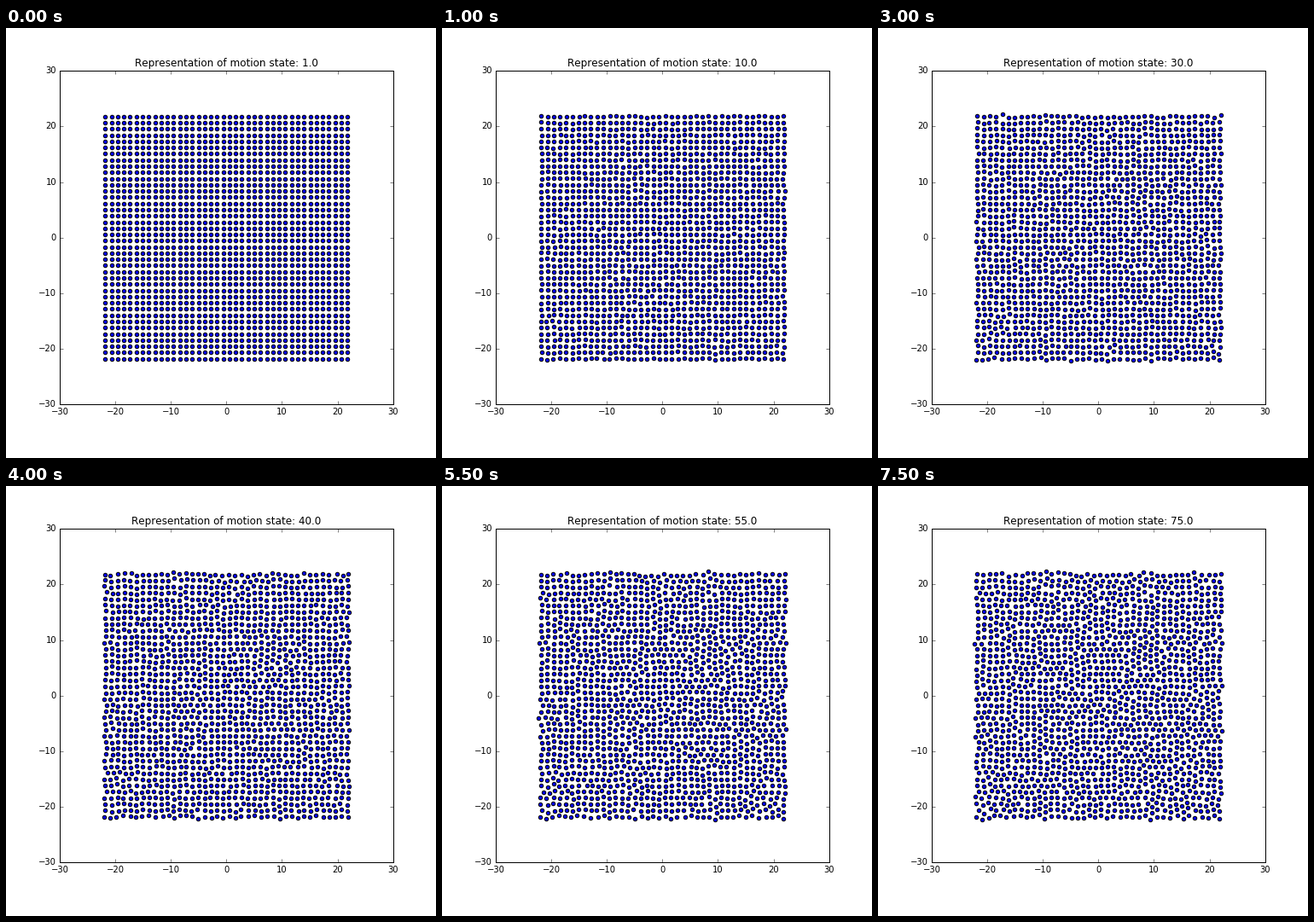
Recreate the animation shown at these times as a matplotlib script. Size 504 by 504 pixels, loop 8 s.

```python
import numpy as np
import matplotlib.pyplot as plt
from matplotlib.animation import FuncAnimation

plt.rcParams.update({
    "font.family": "DejaVu Sans", "font.size": 10,
    "text.kerning_factor": 6, "ytick.alignment": "center",
    "axes.linewidth": 1.0, "axes.titlesize": 12,
    "axes.titlepad": 5, "axes.titley": 1.0,
})

SIDE = 40            # particles per row
DENSITY = 0.8
TEMPERATURE = 0.3
MAX_STEP = 0.075     # largest trial move along each axis
STATES = [1] + list(range(5, 80, 5))
SHIFTS = [(i, j) for i in range(-2, 3) for j in range(-2, 3) if (i, j) != (0, 0)]


def energy(here, near):
    """Lennard-Jones energy of each particle with its neighbours."""
    r2 = np.maximum(((near - here) ** 2).sum(-1), 0.3)
    inv6 = r2 ** -3
    return (4 * (inv6 ** 2 - inv6)).sum(0)


def sweep(grid, rng):
    """One Metropolis sweep; particles three cells apart move together."""
    for k in rng.permutation(9):
        rows, cols = np.meshgrid(np.arange(k // 3, SIDE, 3) + 2,
                                 np.arange(k % 3, SIDE, 3) + 2, indexing="ij")
        here = grid[rows, cols]
        near = np.array([grid[rows + i, cols + j] for i, j in SHIFTS])
        trial = here + rng.uniform(-MAX_STEP, MAX_STEP, here.shape)
        rise = energy(trial, near) - energy(here, near)
        accept = rng.random(rise.shape) < np.exp(-np.maximum(rise, 0) / TEMPERATURE)
        grid[rows, cols] = np.where(accept[..., None], trial, here)


def simulate():
    rng = np.random.default_rng(8)
    axis = (np.arange(SIDE) - (SIDE - 1) / 2) / np.sqrt(DENSITY)
    grid = np.full((SIDE + 4, SIDE + 4, 2), 1e4)   # far-away padding
    grid[2:-2, 2:-2] = np.stack(np.meshgrid(axis, axis), -1)
    shots = []
    for step in range(1, STATES[-1] + 1):
        if step > 1:
            sweep(grid, rng)
        if step in STATES:
            shots.append(grid[2:-2, 2:-2].reshape(-1, 2).copy())
    return shots


shots = simulate()

fig = plt.figure(figsize=(7, 7), dpi=72, facecolor="white")
ax = fig.add_axes([0.125, 0.125, 0.775, 0.775])
dots = ax.scatter(*shots[0].T, s=20, c="#0000ff", edgecolors="black", linewidths=1)
ax.set(xlim=(-30, 30), ylim=(-30, 30),
       xticks=range(-30, 31, 10), yticks=range(-30, 31, 10))
ax.tick_params(direction="in", length=4, width=0.5, pad=4, top=True, right=True)
title = ax.set_title("")


def draw(i):
    dots.set_offsets(shots[i])
    title.set_text(f"Representation of motion state: {STATES[i]:.1f}")
    return dots, title


anim = FuncAnimation(fig, draw, frames=len(STATES), interval=500,
                     repeat=True, repeat_delay=0, blit=False)
plt.show()
```
